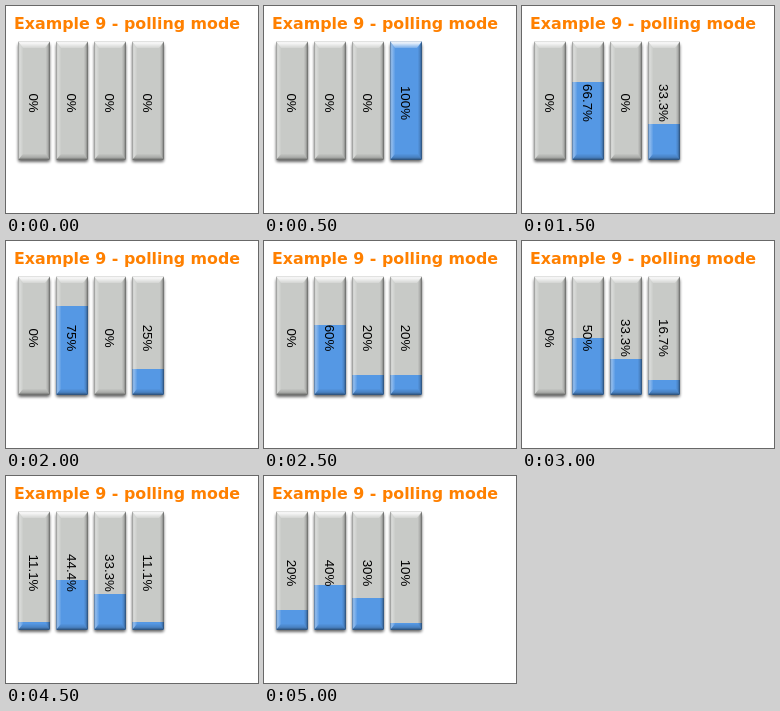
These frames come from a looping animation (252 by 207 pixels, 7000 ms). An HTML page:

```html
<!DOCTYPE html>
<html lang="en">
<head>
<meta charset="utf-8">
<title>Polling mode</title>
<style>
  html, body { margin: 0; width: 100%; height: 100%; overflow: hidden; background: #fff; }
  svg { display: block; width: 252px; height: 207px; }
  .title { font: bold 15.85px "DejaVu Sans", sans-serif; fill: #ff8000; }
  .label { font: 13.33px "Liberation Sans", Arial, sans-serif; fill: #000; text-anchor: middle; }
</style>
</head>
<body>
<svg viewBox="0 0 252 207">
  <defs>
    <filter id="blur" x="-30%" y="-10%" width="160%" height="120%"><feGaussianBlur stdDeviation="1.5"/></filter>
    <linearGradient id="topShine" x2="0" y2="1">
      <stop stop-color="#ddd" stop-opacity=".8"/><stop offset=".25" stop-color="#fff" stop-opacity=".9"/>
      <stop offset="1" stop-color="#fff" stop-opacity=".2"/>
    </linearGradient>
    <linearGradient id="bottomShade" x2="0" y2="1">
      <stop stop-opacity=".02"/><stop offset=".55" stop-opacity=".15"/><stop offset="1" stop-opacity=".5"/>
    </linearGradient>
    <linearGradient id="leftShine">
      <stop stop-color="#444" stop-opacity=".5"/><stop offset=".35" stop-color="#fff" stop-opacity=".35"/>
      <stop offset="1" stop-color="#fff" stop-opacity=".05"/>
    </linearGradient>
    <linearGradient id="rightShade">
      <stop stop-opacity=".02"/><stop offset=".5" stop-opacity=".15"/><stop offset="1" stop-opacity=".5"/>
    </linearGradient>
    <clipPath id="body"><rect y="35" width="32" height="119" rx="1.5"/></clipPath>
    <rect id="shadow" y="38" width="32" height="118" rx="2" opacity=".6" filter="url(#blur)"/>
    <g id="bevel" clip-path="url(#body)">
      <path d="M0 35L5 42V148L0 154Z" fill="url(#leftShine)"/>
      <path d="M32 35L28 42V148L32 154Z" fill="url(#rightShade)"/>
      <path d="M0 35H32L27 42H5Z" fill="url(#topShine)"/>
      <path d="M0 154L5 148H28L32 154Z" fill="url(#bottomShade)"/>
    </g>
  </defs>
  <text class="title" x="8" y="23">Example 9 - polling mode</text>
  <g id="bars"></g>
</svg>
<script>
  const VOTES = [3, 1, 1, 1, 2, 2, 2, 1, 0, 0];
  const STEP = 500, LOOP = 7000, BAR_COUNT = 4;
  const BOTTOM = 159.5, TRACK = 126;

  const group = document.getElementById('bars');
  group.innerHTML = Array.from({ length: BAR_COUNT }, (_, i) => `
    <g transform="translate(${12 + 38 * i})">
      <use href="#shadow"/>
      <g clip-path="url(#body)">
        <rect y="35" width="32" height="119" fill="#c8cac7"/>
        <rect class="fill" width="32" height="${TRACK}" fill="#5598e4"/>
      </g>
      <use href="#bevel"/>
      <text class="label" transform="translate(11 97) rotate(90)"></text>
    </g>`).join('');
  const fills = group.querySelectorAll('.fill');
  const labels = group.querySelectorAll('.label');

  let shown = -1;
  function show(count) {
    if (count === shown) return;
    shown = count;
    const cast = VOTES.slice(0, count);
    for (let i = 0; i < BAR_COUNT; i++) {
      const share = count ? cast.filter(v => v === i).length / count : 0;
      fills[i].setAttribute('y', Math.round(BOTTOM - TRACK * share));
      labels[i].textContent = +(share * 100).toFixed(1) + '%';
    }
  }

  function tick() {
    const time = performance.now() % LOOP;
    show(Math.min(VOTES.length, Math.floor(time / STEP)));
    requestAnimationFrame(tick);
  }
  tick();
</script>
</body>
</html>
```
